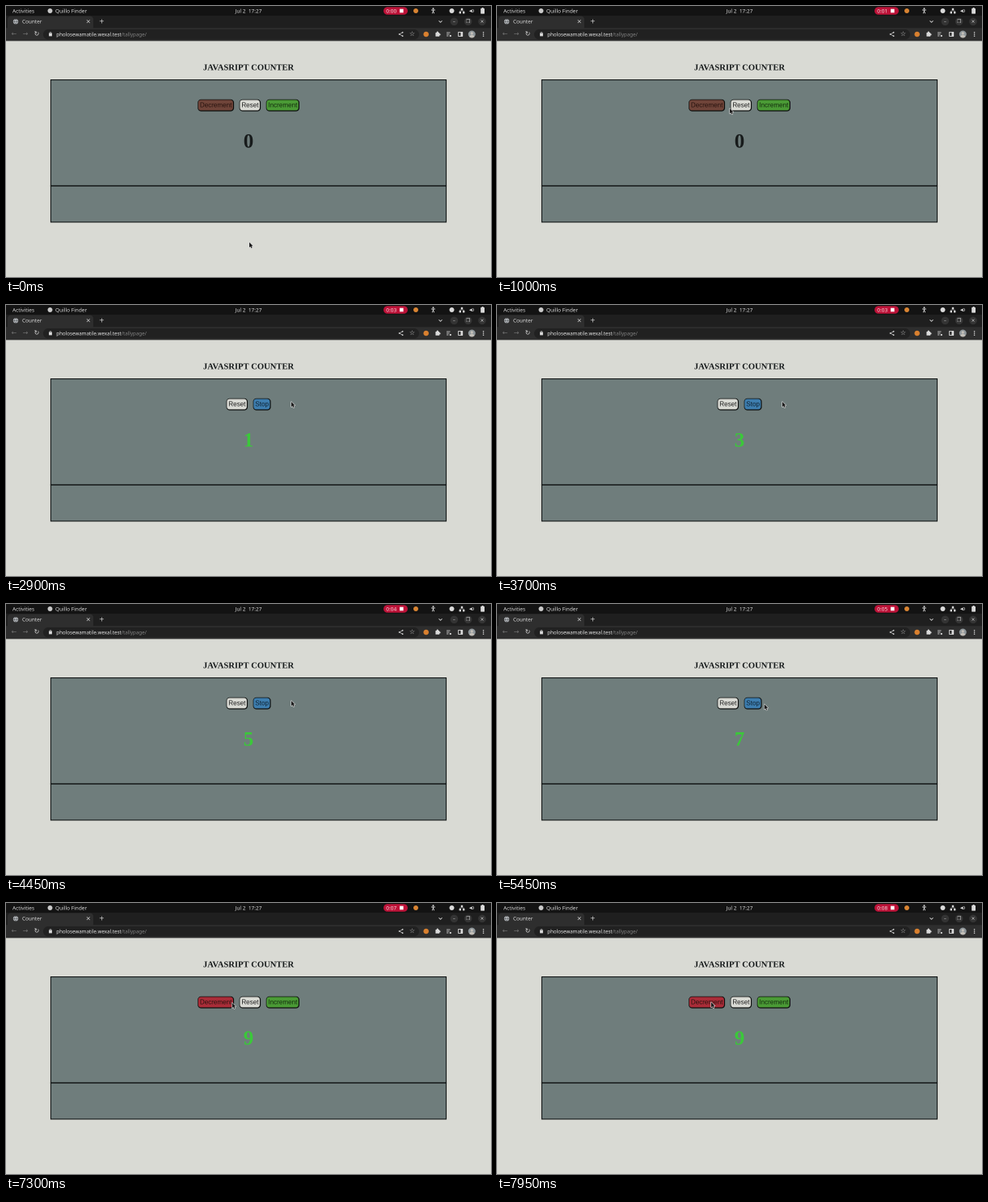
An HTML page with a canvas that plays this animation: 600 px wide and 336 px high, repeating every 8 s.

```html
<!DOCTYPE html>
<html lang="en">
<head>
<meta charset="utf-8">
<title>Counter</title>
<style>
html, body { margin: 0; width: 100%; height: 100%; overflow: hidden; background: #d9dad4; }
canvas { display: block; width: 600px; height: 336px; }
</style>
</head>
<body>
<canvas id="stage"></canvas>
<script>
const W = 600, H = 336, MID = W / 2, LOOP = 8000, STEP = 50;
const UI = '"Noto Sans", "Open Sans", sans-serif';
const SANS = '"Liberation Sans", Arial, sans-serif';
const SERIF = '"Liberation Serif", "Times New Roman", serif';
const ICONS = '"DejaVu Sans", sans-serif';
const INK = '#dadada', DIM = '#747474', EDGE = '#121616';
const PANEL = { x: 54.9, y: 91, w: 490.2, h: 177.5 };
const START = 1925, STOP = 6550, TICK = 500, LAST = 9;

const canvas = document.getElementById('stage');
const ctx = canvas.getContext('2d');
// Draw at double size so that small text is smoothed when shown.
const ratio = 2 * (window.devicePixelRatio || 1);
canvas.width = W * ratio;
canvas.height = H * ratio;
ctx.scale(ratio, ratio);

const home = { x: 301, y: 293 };
const moves = [
  { from: 200, to: 900, x: 288, y: 127 },
  { from: 1150, to: 1700, x: 353, y: 120 },
  { from: 4800, to: 5800, x: 322, y: 126 },
  { from: 6700, to: 7600, x: 265, y: 123 }
];

const looks = {
  Decrement: { fill: '#6f4439', hover: '#a92c38', ink: '#27130f' },
  Reset: { fill: '#d9dad4', hover: '#e6e6e2', ink: '#1d1d1d' },
  Increment: { fill: '#4a9a35', hover: '#39c636', ink: '#142c0f' },
  Stop: { fill: '#3d7dae', hover: '#398dcc', ink: '#102433' }
};

function rect(x, y, w, h, color, r = 0) {
  ctx.beginPath();
  ctx.roundRect(x, y, w, h, r);
  ctx.fillStyle = color;
  ctx.fill();
}

function disc(x, y, r, color = INK) {
  ctx.beginPath();
  ctx.arc(x, y, r, 0, Math.PI * 2);
  ctx.fillStyle = color;
  ctx.fill();
}

function arc(x, y, r, from, to) {
  ctx.beginPath();
  ctx.arc(x, y, r, from, to);
  ctx.strokeStyle = INK;
  ctx.lineWidth = 0.8;
  ctx.stroke();
}

function line(width, ...points) {
  ctx.beginPath();
  points.forEach(([x, y]) => ctx.lineTo(x, y));
  ctx.strokeStyle = INK;
  ctx.lineWidth = width;
  ctx.stroke();
}

function text(s, x, y, font, color = INK, align = 'left') {
  ctx.font = font;
  ctx.textAlign = align;
  ctx.fillStyle = color;
  ctx.fillText(s, x, y);
  return ctx.measureText(s).width;
}

function glyph(s, x, y, size, color = INK) {
  ctx.textBaseline = 'middle';
  text(s, x, y, size + 'px ' + ICONS, color, 'center');
  ctx.textBaseline = 'alphabetic';
}

const clamp = (v, lo, hi) => Math.max(lo, Math.min(hi, v));

function pointerAt(t) {
  return moves.reduce((p, m) => {
    const u = clamp((t - m.from) / (m.to - m.from), 0, 1);
    const e = u * u * (3 - 2 * u);
    return { x: p.x + (m.x - p.x) * e, y: p.y + (m.y - p.y) * e };
  }, home);
}

function drawSystemBar(t) {
  const y = 6, base = 8.3, font = '6.5px ' + UI;
  rect(0, 0, W, 12, '#131313');
  text('Activities', 8, base, font);
  disc(54.5, y, 3, '#c9c9c9');
  text('Quillo Finder', 61, base, font);
  text('Jul 2  17:27', MID, base, font, INK, 'center');

  rect(467, 1.3, 30, 9.4, '#bd1238', 4.7);
  text('0:0' + Math.floor((t + 200) / 1000), 470.3, base, font, '#f4dce0');
  rect(487, y - 2.3, 4.6, 4.6, '#fff');

  disc(507, y, 3, '#d98432');
  disc(528.5, 3.2, 1);
  line(0.9, [526, 5], [531, 5]);
  line(1.2, [528.5, 5], [528.5, 7]);
  line(0.8, [527.2, 9.3], [528.5, 6.6], [529.8, 9.3]);
  disc(551.5, y, 3);

  for (const [dx, dy] of [[0, -2], [-2.2, 2.2], [2.2, 2.2]]) {
    line(0.6, [564, y], [564 + dx, y], [564 + dx, y + dy]);
    rect(562.8 + dx, y - 1.2 + dy, 2.4, 2.4, INK);
  }
  glyph('◀', 574.8, y, 5);
  arc(576, y, 2.4, -0.9, 0.9);
  rect(588.6, 2, 2, 2, INK);
  rect(587.2, 3, 4.8, 6.6, INK, 0.6);
}

function drawTabs() {
  const y = 19.3;
  rect(0, 12, W, 16, '#1f1f1f');
  rect(2, 12.5, 106, 16, '#2e2e2e', [4, 4, 0, 0]);
  disc(12, y, 3.2, '#b9bcc0');
  ctx.beginPath();
  ctx.ellipse(12, y, 1.3, 3, 0, 0, Math.PI * 2);
  ctx.moveTo(9, y);
  ctx.lineTo(15, y);
  ctx.strokeStyle = '#45484b';
  ctx.lineWidth = 0.5;
  ctx.stroke();
  text('Counter', 20, 21.6, '6.4px ' + UI);
  glyph('×', 101.8, y, 7.5);
  glyph('+', 118.4, y, 8);

  line(0.9, [535.5, y - 1], [537.5, y + 1], [539.5, y - 1]);
  ['–', '❐', '×'].forEach((s, i) => {
    const x = 554.4 + i * 17.3;
    disc(x, y, 4.8, '#343434');
    glyph(s, x, y, 6);
  });
}

function drawToolbar() {
  const y = 35;
  rect(0, 27.3, W, 16.1, '#2e2e2e');
  rect(46, 29, 465, 12.4, '#212121', 6.2);
  glyph('←', 9.8, y, 8, DIM);
  glyph('→', 24, y, 8, DIM);
  glyph('↻', 38, y, 8);

  arc(55, y - 1, 1.2, Math.PI, 0);
  rect(53.1, y - 1, 3.8, 3.4, INK);
  const font = '6.2px ' + UI;
  const host = text('pholosewamatile.wexal.test', 62.3, 37.3, font, '#e8e8e8');
  text('/tallypage/', 62.3 + host, 37.3, font, '#858585');

  const hub = [486.6, y], forks = [[490.6, y - 2.2], [490.6, y + 2.2]];
  line(0.6, forks[0], hub, forks[1]);
  [hub, ...forks].forEach(([x, cy]) => disc(x, cy, 0.9));
  glyph('☆', 502.5, y, 8);

  disc(519.7, y, 3.3, '#d9802f');
  rect(531.4, y - 2, 4.8, 4.8, INK, 0.6);
  disc(533.8, y - 2.4, 1.1);
  disc(536.5, y + 0.4, 1.1);
  for (let i = -1; i <= 1; i++) line(0.8, [545, y + i * 2], [548.5 - i, y + i * 2]);
  disc(549.8, y + 2, 1.1);
  rect(559.2, y - 3, 6, 6, INK, 0.6);
  rect(560.1, y - 2.1, 2.4, 4.2, '#2e2e2e');

  ctx.save();
  disc(576.3, y, 4.5, '#8f979b');
  ctx.clip();
  disc(576.3, y - 1.1, 1.6, '#c3bfb8');
  disc(576.3, y + 4, 3.3, '#c3bfb8');
  ctx.restore();
  for (let i = -1; i <= 1; i++) disc(590.6, y + i * 2.3, 0.75);
}

function drawButtons(labels, pointer) {
  const font = '8.1px ' + SANS, pad = 5.3, gap = 6.6, y = 115.8, h = 14.8;
  ctx.font = font;
  const widths = labels.map(s => ctx.measureText(s).width + pad);
  const total = widths.reduce((a, b) => a + b, gap * (labels.length - 1));
  let x = MID + 0.1 - total / 2;
  labels.forEach((label, i) => {
    const w = widths[i], look = looks[label];
    const hot = pointer.x > x && pointer.x < x + w && pointer.y > y && pointer.y < y + h;
    rect(x, y, w, h, '#0d0f0e', 4);
    rect(x + 0.7, y + 0.7, w - 1.9, h - 1.9, hot ? look.hover : look.fill, 3.2);
    text(label, x + w / 2, 125.6, font, look.ink, 'center');
    x += w + gap;
  });
}

function drawPage(t, pointer) {
  const { x, y, w, h } = PANEL, line = 1.1;
  rect(0, 43, W, H - 43, '#d9dad4');
  text('JAVASRIPT COUNTER', MID, 79.4, 'bold 10.6px ' + SERIF, '#161a1b', 'center');
  rect(x, y, w, h, EDGE);
  rect(x + line, y + line, w - 2 * line, h - 2 * line, '#6f7d7c');
  rect(x, 222.3, w, 1.5, EDGE);

  const running = t >= START && t < STOP;
  drawButtons(running ? ['Reset', 'Stop'] : ['Decrement', 'Reset', 'Increment'], pointer);

  const count = clamp(Math.floor((t - START) / TICK), 0, LAST);
  text(count, MID, 175.6, 'bold 25px ' + SERIF, count ? '#3bc83a' : '#171b1b', 'center');
}

function drawPointer({ x, y }) {
  const tip = new Path2D('M0 0V6.4L1.5 5.1 2.5 7.4 3.6 6.9 2.6 4.7 4.5 4.5Z');
  ctx.save();
  ctx.translate(x, y);
  ctx.lineJoin = 'round';
  ctx.strokeStyle = '#e4e4e4';
  ctx.lineWidth = 1.1;
  ctx.stroke(tip);
  ctx.fillStyle = '#1c1c1c';
  ctx.fill(tip);
  ctx.restore();
}

function frame() {
  const t = Math.floor((performance.now() - begin) % LOOP / STEP) * STEP;
  const pointer = pointerAt(t);
  drawPage(t, pointer);
  drawSystemBar(t);
  drawTabs();
  drawToolbar();
  drawPointer(pointer);
  requestAnimationFrame(frame);
}

const begin = performance.now();
frame();
</script>
</body>
</html>
```
